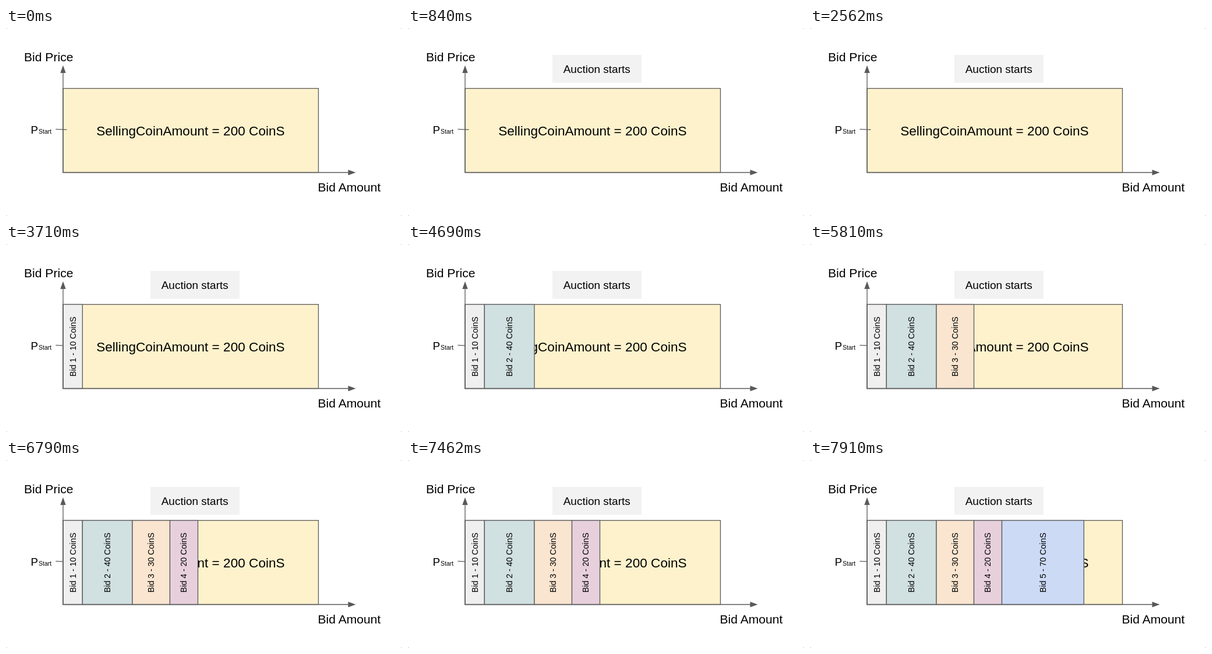
An HTML page that plays this animation: 680x322 px, repeating every 8000 ms.

```html
<!DOCTYPE html>
<html lang="en">
<head>
<meta charset="utf-8">
<title>Auction bids</title>
<style>
  html, body { margin: 0; width: 100%; height: 100%; overflow: hidden; background: #8a8a8a; }
  svg { display: block; width: 680px; height: 322px; }
  text { font-family: "Liberation Sans", Arial, sans-serif; fill: #000; }
  .line { stroke: #595959; stroke-width: 1.3; }
  .head { fill: #595959; }
</style>
</head>
<body>
<svg viewBox="0 0 680 322">
  <rect width="680" height="322" rx="2" fill="#fff"/>
  <rect class="line" x="98" y="103.5" width="438.5" height="144" fill="#fdf2cc"/>
  <text x="155.2" y="183.5" font-size="22.6">SellingCoinAmount = 200 CoinS</text>
  <path class="line" d="M85.5 173.4L104.5 174.2"/>
  <g id="bids"></g>
  <path class="line" fill="none" d="M98 76V247.5H588"/>
  <path class="head" d="M98 64L102.7 77H93.3Z M600.5 247.5L587.5 252.2V242.8Z"/>
  <text x="31" y="56.5" font-size="21.1">Bid Price</text>
  <text x="535.5" y="280" font-size="21.1">Bid Amount</text>
  <text x="42.5" y="180.5" font-size="18.8">P<tspan x="56" font-size="10.5">Start</tspan></text>
  <g id="banner">
    <rect x="248" y="46" width="153" height="48" fill="#f2f2f2"/>
    <text x="266.7" y="77.2" font-size="19">Auction starts</text>
  </g>
</svg>
<script>
const LOOP = 8000;
const NS = "http://www.w3.org/2000/svg";

// start time, left, right, text centre, coins, fill
const bids = [
  [3710, 98, 131.3, 114.7, 10, "#efefef"],
  [4690, 131.3, 217, 174.5, 40, "#d1e0e1"],
  [5810, 217, 281.5, 249.3, 30, "#f9e5d0"],
  [6790, 281.5, 329.5, 305.5, 20, "#e7d0dc"],
  [7910, 329.5, 470.3, 399.7, 70, "#ccdaf6"]
];

function add(parent, tag, attrs) {
  const el = document.createElementNS(NS, tag);
  for (const key in attrs) el.setAttribute(key, attrs[key]);
  return parent.appendChild(el);
}

const steps = [[840, document.getElementById("banner")]];

bids.forEach(([start, left, right, mid, coins, fill], i) => {
  const group = add(document.getElementById("bids"), "g", {});
  add(group, "rect", { class: "line", x: left, y: 103.5, width: right - left, height: 144, fill });
  const label = add(group, "text", { transform: `translate(${mid + 4.9} 227) rotate(-90)`, "font-size": 14.1 });
  label.textContent = `Bid ${i + 1} - ${coins} CoinS`;
  steps.push([start, group]);
});

const origin = performance.now();

function draw(now) {
  const t = Math.max(0, now - origin) % LOOP;
  for (const [start, el] of steps) el.style.visibility = t >= start ? "visible" : "hidden";
  requestAnimationFrame(draw);
}
draw(origin);
</script>
</body>
</html>
```
